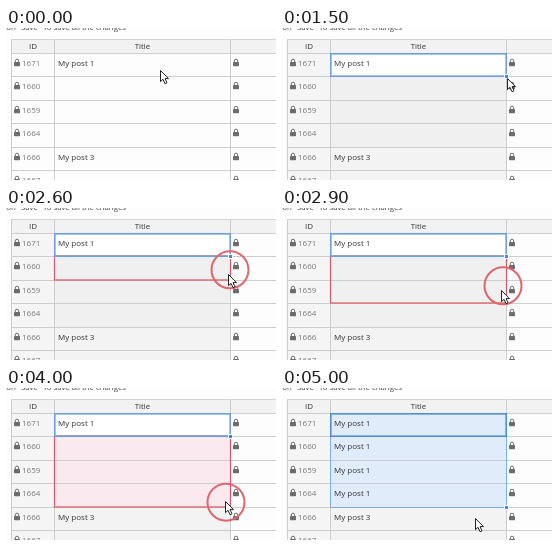
Recreate the animation shown at these times as an HTML page with a canvas. Size 270x152 px, loop 5100 ms.

```html
<!DOCTYPE html>
<html lang="en">
<head>
<meta charset="utf-8">
<title>Drag to fill cells</title>
<style>
  html, body { margin: 0; width: 100%; height: 100%; overflow: hidden; background: #fff; }
  canvas { display: block; width: 100vw; height: 100vh; }
</style>
</head>
<body>
<canvas id="stage" width="270" height="152"></canvas>
<script>
const ctx = document.getElementById('stage').getContext('2d');
const LOOP = 5100, STEP = 100;
const LEFT = 5, TITLE = 48, LOCKS = 224, HEADER = 11, FIRST = 25, ROW = 23.4;
const SELECT = 300, DRAG = 2400, TINT = 4000, DROP = 4400;
const ids = [1671, 1660, 1659, 1664, 1666, 1667];
const rowTop = i => Math.round(FIRST + i * ROW);

// Pointer tip: time, x, y
const path = [
  [0, 154, 42], [100, 154, 43], [600, 154, 43], [900, 207, 49], [1200, 217, 49],
  [1500, 225, 50], [2300, 225, 50], [2900, 219, 82], [3300, 219, 110.5],
  [3600, 219, 113], [4300, 219, 113], [4400, 217, 115], [4900, 217, 115], [5000, 193, 130]
];

function pointerAt(t) {
  const next = path.findIndex(p => p[0] > t);
  if (next < 0) return path[path.length - 1].slice(1);
  const [t0, x0, y0] = path[next - 1], [t1, x1, y1] = path[next];
  const k = (t - t0) / (t1 - t0);
  return [x0 + (x1 - x0) * k, y0 + (y1 - y0) * k];
}

function rect(x, y, w, h, color) {
  ctx.fillStyle = color;
  ctx.fillRect(x, y, w, h);
}

function outline(x, y, w, h, color, width) {
  ctx.strokeStyle = color;
  ctx.lineWidth = width;
  ctx.strokeRect(x, y, w, h);
}

function text(value, x, y, color, align = 'left', size = 8) {
  ctx.font = `${size}px "Open Sans", sans-serif`;
  ctx.textAlign = align;
  ctx.fillStyle = color;
  ctx.fillText(value, x, y);
}

function lock(x, y) {
  const color = '#6c6c6c';
  ctx.fillStyle = color;
  ctx.beginPath();
  ctx.roundRect(x, y + 3, 6, 4.2, .8);
  ctx.fill();
  ctx.strokeStyle = color;
  ctx.lineWidth = 1;
  ctx.beginPath();
  ctx.moveTo(x + 1.3, y + 3);
  ctx.arc(x + 3, y + 1.9, 1.7, Math.PI, 0);
  ctx.lineTo(x + 4.7, y + 3);
  ctx.stroke();
}

// Fills a band of title cells, from one row up to another
function fillTitles(from, to, color) {
  rect(TITLE, rowTop(from), LOCKS - TITLE, rowTop(to) - rowTop(from), color);
}

function drawCells(t) {
  const selected = t >= SELECT, filled = t >= DROP;
  rect(0, 0, 270, 152, '#fdfdfd');
  text('on "Save" To save all the changes', 120, 2, '#444', 'right', 7.8);
  rect(LEFT, HEADER, 265, FIRST - HEADER, '#f2f2f3');

  if (selected) {
    rect(LEFT, FIRST, TITLE - LEFT, 127, '#f6f5f6');
    fillTitles(1, 4, '#f1f0f1');
    fillTitles(4, 6, '#f4f3f4');
    fillTitles(0, 1, '#fff');
  }
  if (filled) fillTitles(0, 4, '#e1ecfb');
  else if (t >= TINT) fillTitles(1, 4, '#fae9ee');

  rect(LEFT, HEADER, 265, 1, '#d4d4d4');
  for (const x of [LEFT, TITLE, LOCKS]) rect(x, HEADER, 1, 141, '#cdcdcd');
  text('ID', 27, 21, '#333', 'center');
  text('Title', 136.5, 21, '#333', 'center', 7.8);

  ids.forEach((id, i) => {
    const y = rowTop(i);
    rect(LEFT, y, 265, 1, '#cdcdcd');
    lock(8, y + 6);
    lock(227, y + 6);
    text(id, 16, y + 13, '#777');
    const title = i === 0 || (filled && i < 4) ? 'My post 1' : i === 4 ? 'My post 3' : '';
    text(title, 52, y + 13, '#333');
  });
}

function drawSelection(t, tipY) {
  const width = LOCKS - TITLE, filled = t >= DROP;
  if (t >= DRAG && !filled) {
    const end = Math.max(2, Math.floor((tipY - FIRST) / ROW) + 1);
    outline(TITLE + .5, rowTop(1), width, rowTop(end) - rowTop(1), '#d9585f', 1.2);
  }
  if (t < SELECT) return;
  const blue = filled ? '#4f8edb' : '#6a9fe4', bottom = rowTop(filled ? 4 : 1);
  if (filled) outline(TITLE + .5, FIRST + .5, width, bottom - FIRST, '#7fabe6', 1);
  outline(TITLE + .8, FIRST + .8, width - .6, rowTop(1) - FIRST - .6, blue, 1.6);
  rect(LOCKS - 2, bottom - 2, 5, 5, '#fff');
  rect(LOCKS - 1, bottom - 1, 3, 3, '#4588d9');
}

function ringOpacity(t) {
  if (t >= SELECT && t < 500) return t < 400 ? .9 : .45;
  if (t >= 1900 && t < DROP) return Math.min(1, (t - 1800) / 300);
  if (t >= DROP && t < 4600) return (4600 - t) / 300;
  return 0;
}

function drawRing(t) {
  const [x, y] = pointerAt(t - STEP);
  ctx.globalAlpha = ringOpacity(t);
  ctx.strokeStyle = '#de676d';
  ctx.lineWidth = 2;
  ctx.beginPath();
  ctx.arc(x + 1, y + 1.2, 18.5, 0, Math.PI * 2);
  ctx.stroke();
  ctx.globalAlpha = 1;
}

const arrow = new Path2D('M.5 .5V11.7L3 9.3 5 13.7 7 12.8 5 8.6H8.5Z');

function drawPointer(x, y) {
  ctx.save();
  ctx.translate(x, y);
  ctx.fillStyle = '#fff';
  ctx.fill(arrow);
  ctx.strokeStyle = '#222';
  ctx.lineWidth = 1;
  ctx.stroke(arrow);
  ctx.restore();
}

function draw(now) {
  const t = Math.floor(now % LOOP / STEP) * STEP;
  const [x, y] = pointerAt(t);
  drawCells(t);
  drawSelection(t, y);
  if (ringOpacity(t)) drawRing(t);
  drawPointer(x, y);
}

const start = performance.now();
function tick() {
  draw(performance.now() - start);
  requestAnimationFrame(tick);
}
tick();
</script>
</body>
</html>
```
